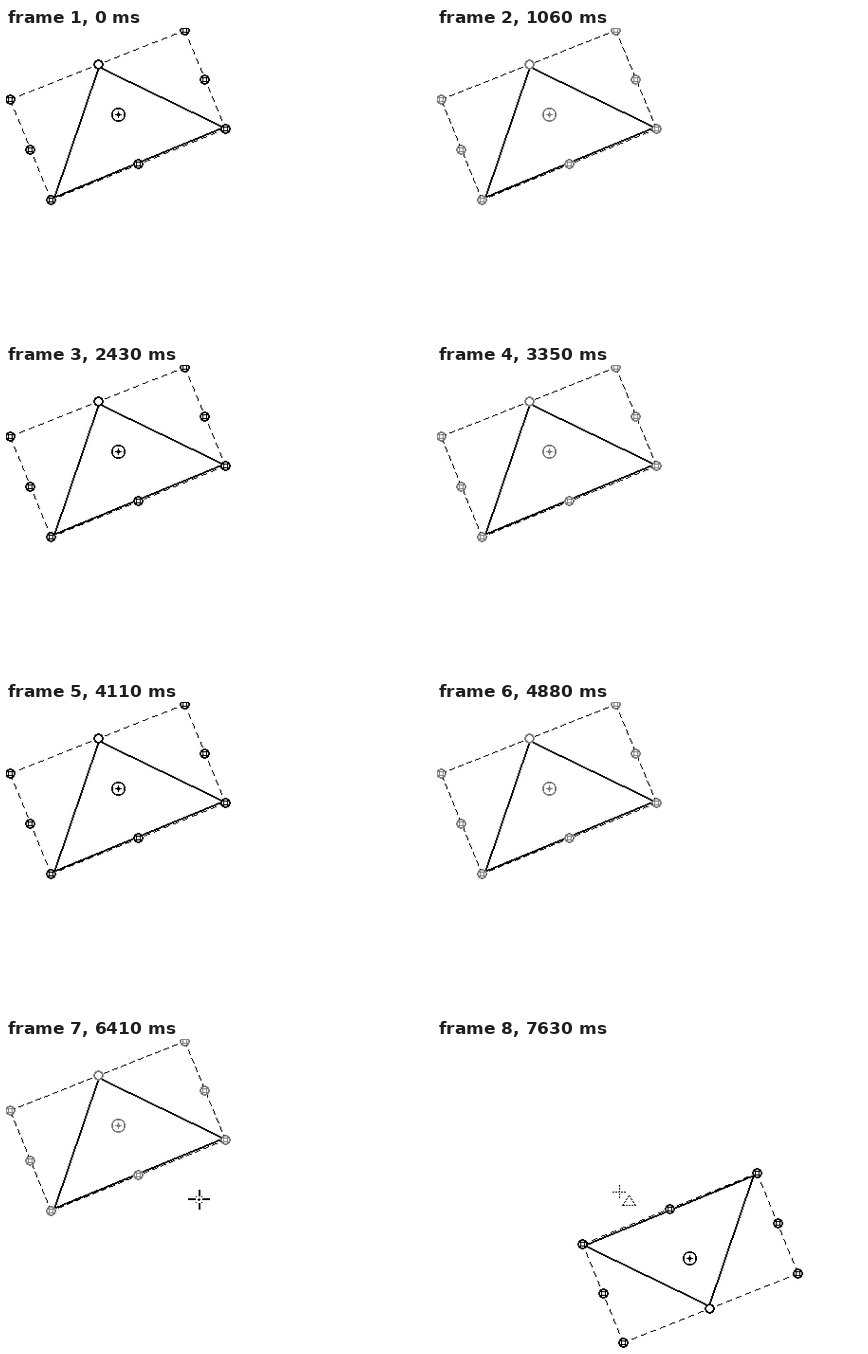
Animation, 448 px wide and 326 px high, one loop 8000 ms. Source, as an HTML page with a canvas:

```html
<!DOCTYPE html>
<html lang="en">
<head>
<meta charset="utf-8">
<title>Flipping a triangle</title>
<style>
  html, body { margin: 0; width: 100%; height: 100%; overflow: hidden; background: #fff; }
  canvas { display: block; image-rendering: pixelated; }
</style>
</head>
<body>
<canvas width="448" height="326"></canvas>
<script>
const LOOP = 8000;
const BLINK = 764.4;
const ctx = document.querySelector('canvas').getContext('2d');

const corners = [[4, 75], [188, 2], [231, 106], [47, 181]];
const apex = [97, 38];
const pivot = [118, 91];
const triangle = [[97, 41], [229, 105], [50, 179]];

// While a flip lasts, a coordinate p on a flipped axis becomes (sum - p).
const flips = [
  { from: 140, to: 450, x: 463, y: 345 },
  { from: 1830, to: 2430, y: 345 },
  { from: 3510, to: 4110, x: 463 },
  { from: 7320, to: LOOP, x: 384, y: 322 },
];

let flip = {};

function dot(x, y, color) {
  ctx.fillStyle = color;
  ctx.fillRect(flip.x ? flip.x - x : x, flip.y ? flip.y - y : y, 1, 1);
}

// Unsmoothed line; gaps in a dashed line are painted white.
function line([x0, y0], [x1, y1], { width = 1, on = 1, off = 0, gap = '#fff' } = {}) {
  const dx = x1 - x0, dy = y1 - y0;
  const steep = Math.abs(dy) > Math.abs(dx);
  const steps = Math.max(Math.abs(dx), Math.abs(dy));
  for (let i = 0; i <= steps; i++) {
    const color = i % (on + off) < on ? '#000' : gap;
    if (!color) continue;
    const x = Math.round(x0 + dx * i / steps);
    const y = Math.round(y0 + dy * i / steps);
    for (let k = 0; k < width; k++) dot(x + (steep ? k : 0), y - (steep ? 0 : k), color);
  }
}

function polygon(points, style) {
  points.forEach((p, i) => line(p, points[(i + 1) % points.length], style));
}

// Paints a disc; inked(x, y, distance) decides which pixels are not white.
function disc([cx, cy], radius, color, inked) {
  const r = Math.ceil(radius);
  for (let y = -r; y <= r; y++) {
    for (let x = -r; x <= r; x++) {
      const d = Math.hypot(x, y);
      if (d < radius) dot(cx + x, cy + y, inked(x, y, d) ? color : '#fff');
    }
  }
}

const isHandle = (x, y, d) => d > 3.2 || Math.max(Math.abs(x), Math.abs(y)) === 2;
const isRing = (x, y, d) => d > 3.2;
const isPivot = (x, y, d) => d > 5.9 || Math.abs(x) + Math.abs(y) < 3 || (x * y === 0 && d < 4);

function drawObject(grey) {
  const ink = grey ? '#808080' : '#000';
  polygon(triangle, { width: 2 });
  polygon(corners, { on: 6, off: grey ? 3 : 4 });
  corners.forEach((p, i) => {
    const next = corners[(i + 1) % 4];
    const middle = p.map((v, axis) => Math.floor((v + next[axis]) / 2));
    disc(p, 5.2, ink, isHandle);
    if (i > 0) disc(middle, 5.2, ink, isHandle);
  });
  disc(apex, 5.2, ink, isRing);
  disc(pivot, 7.4, ink, isPivot);
}

function drawPointer(x, y) {
  for (const s of [-1, 1]) {
    line([x + 4 * s, y], [x + 11 * s, y], { width: 2 });
    line([x, y + 4 * s], [x, y + 10 * s], { width: 2 });
    dot(x + 3 * s, y + 3 * s, '#000');
    dot(x + 3 * s, y - 3 * s, '#000');
  }
  line([x - 1, y], [x + 1, y]);
  line([x, y - 1], [x, y + 1]);
}

function drawPlacer(x, y) {
  const dotted = { on: 2, off: 1, gap: null };
  line([x - 7, y], [x + 7, y], dotted);
  line([x, y - 7], [x, y + 7], dotted);
  polygon([[x + 10, y + 4], [x + 17, y + 14], [x + 3, y + 14]], dotted);
}

function draw(t) {
  ctx.clearRect(0, 0, 448, 326);

  const beat = (t - 290 + BLINK) % BLINK;
  const grey = beat < (t < 3000 ? 310 : 455);
  flip = flips.find(f => t >= f.from && t < f.to) || {};
  drawObject(grey);

  flip = {};
  if (t >= 6590) {
    drawPlacer(192, 161);
  } else if (t >= 5800) {
    const step = Math.min(4, Math.floor((t - 5800) / 152));
    drawPointer(239 - 9 * step, 181 - 3 * step);
  }
}

function tick() {
  draw(performance.now() % LOOP);
  requestAnimationFrame(tick);
}
tick();
</script>
</body>
</html>
```
